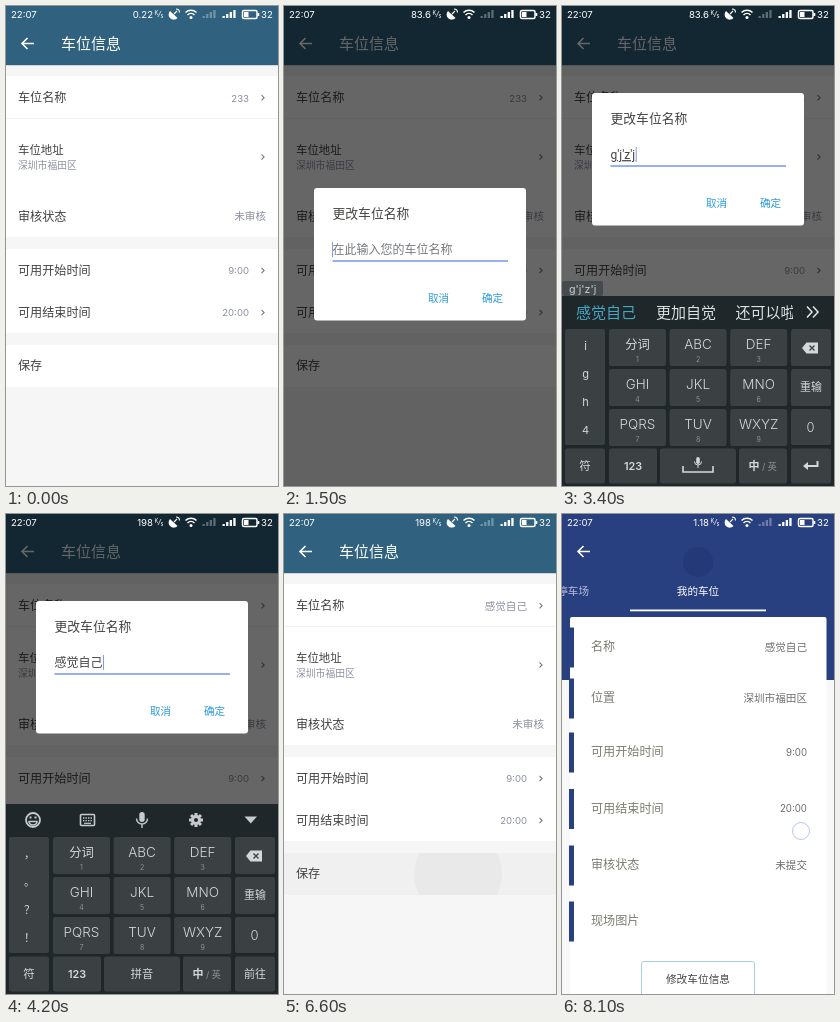
Write an HTML page that moves like this. It is 272x480 px and loops after 8200 ms.

```html
<!DOCTYPE html>
<html lang="zh-CN">
<head>
<meta charset="utf-8">
<style>
html, body { margin: 0; width: 100%; height: 100%; overflow: hidden; background: #f6f6f6; }
svg { display: block; width: 272px; height: 480px; }
text { font-family: Inter, "Noto Sans CJK SC", "Noto Sans CJK", sans-serif; white-space: pre; }
#field { font-family: Roboto, "Noto Sans CJK SC", "Noto Sans CJK", sans-serif; }
</style>
</head>
<body>
<svg id="stage" viewBox="0 0 272 480"></svg>
<script>
const LOOP = 8200, STEP = 100;
const $ = id => document.getElementById(id);

// Markup helpers; text is placed by its vertical centre.
const text = (x, cy, s, size, fill, anchor = 'start', more = '') =>
  `<text x="${x}" y="${cy + size * .37}" font-size="${size}" fill="${fill}" text-anchor="${anchor}" ${more}>${s}</text>`;
const rect = (x, y, w, h, fill, more = '') =>
  `<rect x="${x}" y="${y}" width="${w}" height="${h}" fill="${fill}" ${more}/>`;
const line = (d, stroke, width = 1.2, more = '') =>
  `<path d="${d}" fill="none" stroke="${stroke}" stroke-width="${width}" ${more}/>`;
const shape = (d, fill) => `<path d="${d}" fill="${fill}"/>`;
const group = (id, body, more = '') => `<g id="${id}" ${more}>${body}</g>`;

const INK = '#424240', SOFT = '#8c90a0', ICON = '#c6cacd';
const chevron = y => line(`M255.5 ${y - 2.6}l2.6 2.6l-2.6 2.6`, '#777b88', 1.1);
const backArrow = line('M28 37.5H16.5M21.5 32l-5.5 5.5l5.5 5.5', '#fff', 1.6);

function statusBar() {
  const bars = (x, fill) => [2, 4, 6, 8].map((h, i) => rect(x + i * 3.6, 12 - h, 2.3, h, fill)).join('');
  return text(5, 8.5, '22:07', 9.6, '#fff') +
    text(147, 8.5, '', 9.6, '#fff', 'end', 'id="speed"') +
    text(148.5, 6.5, 'K', 5.5, '#fff') + line('M152 11l3 -6', '#fff', .7) + text(154.5, 9.5, 's', 5.5, '#fff') +
    shape('M164 5a5 5 0 0 0 7.5 7z', '#fff') + line('M168 8l3 -3M170 3a3.5 3.5 0 0 1 3.5 3.5', '#fff', 1.1) +
    line('M179.5 6.5a8 8 0 0 1 11 0M181.5 9a5 5 0 0 1 7 0', '#fff', 1.5) +
    '<circle cx="185" cy="11.5" r="1.5" fill="#fff"/>' +
    bars(196.5, '#ffffff50') + bars(216.5, '#fff') +
    rect(236.5, 4.5, 14.5, 8, 'none', 'rx="1.5" stroke="#fff" stroke-width="1.5"') + rect(251.5, 7, 1.8, 3, '#fff') +
    rect(238, 6, 4.5, 5, '#fff') + text(255, 8.5, '32', 9.6, '#fff');
}

function infoPage() {
  const panel = (y, h) => rect(0, y, 272, h, '#fff');
  const row = (y, label, value, more = true) =>
    text(12, y, label, 12.1, INK) +
    text(more ? 243 : 260, y, value, /\d/.test(value) ? 9.6 : 10.6, SOFT, 'end', label === '车位名称' ? 'id="name"' : '') +
    (more ? chevron(y) : '');
  return rect(0, 0, 272, 480, '#f6f6f6') +
    panel(70, 161) + panel(243, 84) + panel(339, 42) +
    rect(0, 112, 272, 1, '#eef4f5') +
    rect(0, 70, 272, 42, '#000', 'id="nameTap" opacity="0"') +
    group('saveTap', rect(0, 339, 272, 42, '#0000000f') +
      '<circle id="ripple" cx="174" cy="360" r="0" fill="#00000008" clip-path="url(#saveRow)"/>') +
    rect(0, 59, 272, 1, '#0002') + rect(0, 0, 272, 59, '#30627f') +
    backArrow + text(55, 37.5, '车位信息', 15, '#fff') +
    row(91.7, '车位名称', '') + text(12, 143.5, '车位地址', 11.4, INK) +
    text(12, 159.5, '深圳市福田区', 9.8, SOFT) + chevron(151) +
    row(210.5, '审核状态', '未审核', false) +
    row(264.5, '可用开始时间', '9:00') + row(306.5, '可用结束时间', '20:00') +
    text(12, 360, '保存', 12.1, INK);
}

function listPage() {
  const rows = [
    [133, '名称', '感觉自己'], [184, '位置', '深圳市福田区'], [238, '可用开始时间', '9:00'],
    [294.5, '可用结束时间', '20:00'], [351, '审核状态', '未提交'], [407, '现场图片', '']
  ];
  return rect(0, 0, 272, 480, '#f8f8f9') + rect(0, 0, 272, 166, '#283f80') +
    '<circle cx="136" cy="48" r="15" fill="#243977"/>' + backArrow +
    text(27, 77, '停车场', 10.6, '#b4bdd8', 'end') +
    text(136, 77, '我的车位', 10.6, '#fff', 'middle', 'font-weight="500"') +
    rect(68, 95.5, 136, 1.8, '#fff') + rect(8, 103, 256.5, 380, '#fff', 'rx="2"') +
    rows.map(([y, label, value]) =>
      rect(7, y - 19.5, 5, 40, '#283f80') + text(29, y, label, 12.1, '#7b7d70') +
      text(245, y, value, /\d/.test(value) ? 9.7 : 10.6, '#6c6e6c', 'end')).join('') +
    '<circle cx="239" cy="317" r="8.5" fill="#fff" stroke="#aab4ee" stroke-width=".8"/>' +
    rect(79.5, 447.5, 113, 40, '#fff', 'rx="2" stroke="#a5d3d5"') +
    text(136, 465.5, '修改车位信息', 10.7, INK, 'middle');
}

function dialog() {
  return rect(30, 182, 212, 132.5, '#fff', 'rx="3"') +
    text(48.5, 207.5, '更改车位名称', 12.8, INK) +
    text(48.5, 243.7, '', 12, INK, 'start', 'id="field"') +
    rect(48.5, 254.3, 175.5, 1.4, '#6c90ea') + rect(48, 236, 1, 15, '#7f9fe8', 'id="caret"') +
    text(154.5, 291.8, '取消', 10.6, '#2d9ae0', 'middle') +
    text(208.5, 291.8, '确定', 10.6, '#2d9ae0', 'middle');
}

function keyboard() {
  const key = (x, y, w, h, body = '', id = '') => rect(x, y, w, h, '#3b4042', `rx="2.5" id="${id}"`) + body;
  const mid = (x, y, s, size = 11.5, more = '') => text(x, y, s, size, '#d4d8da', 'middle', more);
  const letters = ['分词', 'ABC', 'DEF', 'GHI', 'JKL', 'MNO', 'PQRS', 'TUV', 'WXYZ'].map((s, i) => {
    const x = 47 + i % 3 * 60.6, y = 323 + Math.floor(i / 3) * 40;
    return key(x, y, 57, 37, mid(x + 28.5, y + 15, s, i ? 13.5 : 12.3, 'font-weight="300"') +
      text(x + 28.5, y + 30, i + 1, 7, '#8d9396', 'middle'), 'key' + (i + 1));
  }).join('');
  const side = chars => chars.map((c, i) => mid(23.5, 340 + i * 28, c, 11)).join('');
  const gear = [0, 45, 90, 135].map(a => rect(188.5, 299, 3, 14, ICON, `transform="rotate(${a} 190 306)"`)).join('');
  const tools =
    line('M34 306a7 7 0 1 0 -14 0a7 7 0 1 0 14 0', ICON, 1.8) + line('M23 307.5a4 3.5 0 0 0 8 0z', ICON, 1.5) +
    rect(23.5, 302.5, 2, 2, ICON) + rect(28.5, 302.5, 2, 2, ICON) +
    rect(74.5, 300.5, 14, 11, 'none', `rx="1" stroke="${ICON}" stroke-width="1.6"`) +
    line('M77 304h9M77 306.6h9', ICON, 1.3, 'stroke-dasharray="1.4 1.1"') + line('M78 309.3h7', ICON, 1.2) +
    rect(133.3, 298, 5.4, 10, ICON, 'rx="2.7"') + line('M130.5 304.5a5.5 5.5 0 0 0 11 0M136 310v4', ICON, 1.4) +
    gear + '<circle cx="190" cy="306" r="3.5" fill="#22282a" stroke="' + ICON + '" stroke-width="3"/>' +
    shape('M238.5 302.5h12.5l-6.25 7z', ICON);
  const picks = rect(0, 275, 41, 15, '#454a4d', 'rx="2"') + text(7, 283, '', 10.7, '#ccd0d2', 'start', 'id="pinyin"') +
    `<g clip-path="url(#pickArea)">${[14, 94, 173.5].map((x, i) =>
      text(x, 306, '', 15, i ? '#dde1e3' : '#45a9c4', 'start', `id="pick${i}"`)).join('')}</g>` +
    line('M245 300.5l5 5.5l-5 5.5M251 300.5l5 5.5l-5 5.5', '#dde1e3', 1.6);
  return rect(0, 290, 272, 192, '#20272a') + letters +
    key(3, 323, 40, 116) + group('marks', side(['，', '。', '？', '！'])) + group('sideKeys', side(['i', 'g', 'h', '4'])) +
    key(229, 323, 40, 37, shape('M240 342l4.5 -5.5h11.5v11h-11.5z', '#d4d8da') + line('M247.5 339.5l5 5M252.5 339.5l-5 5', '#3b4042', 1.3)) +
    key(229, 363, 40, 37, mid(249, 381, '重输', 11)) + key(229, 403, 40, 36, mid(248.5, 421, '0', 13, 'font-weight="300"')) +
    key(3, 442.5, 40, 35, mid(23, 460, '符', 11.5)) +
    key(47, 442.5, 48, 35, mid(71, 460, '123', 10.8, 'font-weight="600"')) + key(98, 442.5, 76, 35) +
    key(177, 442.5, 48, 35, mid(192, 460, '中', 11, 'font-weight="600"') + text(200, 460.5, '/ 英', 9, '#8d9396')) +
    key(229, 442.5, 40, 35) +
    group('idle', tools + mid(136, 460, '拼音', 11.2) + mid(249, 460, '前往', 11)) +
    group('active', picks + line('M121 460v6h30v-6', '#d4d8da', 1.6) + rect(134.2, 451, 3.6, 7, '#d4d8da', 'rx="1.8"') +
      line('M132.5 455.5a3.5 3.5 0 0 0 7 0M136 459v3', '#d4d8da', 1) +
      line('M255.5 455v5h-12', '#d4d8da', 2) + shape('M246 456v8l-5 -4z', '#d4d8da'));
}

$('stage').innerHTML =
  '<clipPath id="saveRow"><rect y="339" width="272" height="42"/></clipPath>' +
  '<clipPath id="pickArea"><rect y="290" width="231" height="32"/></clipPath>' +
  listPage() + group('info', infoPage()) + rect(0, 0, 272, 480, '#000', 'id="shade"') +
  group('dialog', dialog()) + group('keys', keyboard()) + statusBar();

// Time, key pressed, pinyin so far and suggestions.
const typing = [
  [2500, 4, 'g', ['个', '给', '过']],
  [2700, 5, "g'j", ['感觉', '国家', '更加']],
  [2900, 9, "g'j'z", ['感觉在', '更加在', '国家在']],
  [3100, 5, "g'j'z'j", ['感觉自己', '更加自觉', '还可以啦']]
];
const PICK = 3700, CONFIRM = 4300;

const clamp = v => Math.max(0, Math.min(1, v));
const ramp = (t, from, to) => clamp((t - from) / (to - from));
const ease = v => 1 - (1 - v) ** 2;
const set = (id, name, value) => $(id).setAttribute(name, value);
const show = (id, on) => set(id, 'visibility', on ? 'visible' : 'hidden');
const shift = (id, y) => set(id, 'transform', `translate(0 ${y})`);

function draw(t) {
  $('speed').textContent = t < 900 ? '0.22' : t < 3900 ? '83.6' : t < 6900 ? '198' : '1.18';
  $('name').textContent = t < CONFIRM ? '233' : '感觉自己';
  set('name', 'font-size', t < CONFIRM ? 9.6 : 10.6);
  set('nameTap', 'opacity', t >= 900 && t < 1200 ? .06 : 0);

  show('saveTap', t >= 6400 && t < 6900);
  set('ripple', 'r', 44 * Math.max(0, (t - 6400) / 200));
  const leave = ease(ramp(t, 6900, 7200));
  set('info', 'opacity', 1 - leave);
  shift('info', 40 * leave);

  const fade = ramp(t, 1100, 1300) - ramp(t, CONFIRM, CONFIRM + 200);
  set('shade', 'opacity', .6 * fade);
  set('dialog', 'opacity', fade);
  const lift = ease(ramp(t, 1800, 2100));
  const drop = ease(ramp(t, CONFIRM, CONFIRM + 200));
  shift('dialog', -95 * lift);
  shift('keys', 192 * (1 - lift + drop));
  show('keys', lift > 0 && drop < 1);

  const state = t < PICK ? typing.filter(s => t >= s[0]).pop() : null;
  const value = state ? state[2] : t >= PICK ? '感觉自己' : '';
  $('field').textContent = value || '在此输入您的车位名称';
  set('field', 'fill', value ? INK : '#77797c');
  set('field', 'text-decoration', state ? 'underline' : 'none');
  set('caret', 'x', value ? 49 + $('field').getComputedTextLength() : 48);
  show('caret', fade > 0 && t % 1000 < 600);

  show('active', state && lift === 1);
  show('sideKeys', state);
  for (const id of ['idle', 'marks']) set(id, 'visibility', state ? 'hidden' : 'inherit');
  $('pinyin').textContent = state ? state[2] : '';
  for (let i = 0; i < 3; i++) $('pick' + i).textContent = state ? state[3][i] : '';
  for (let k = 1; k < 10; k++)
    set('key' + k, 'fill', state && state[1] === k && t < state[0] + 100 ? '#5a6063' : '#3b4042');
}

let start;
function tick(now) {
  start ??= now;
  draw(Math.floor((now - start) % LOOP / STEP) * STEP);
  requestAnimationFrame(tick);
}
draw(0);
requestAnimationFrame(tick);
</script>
</body>
</html>
```
